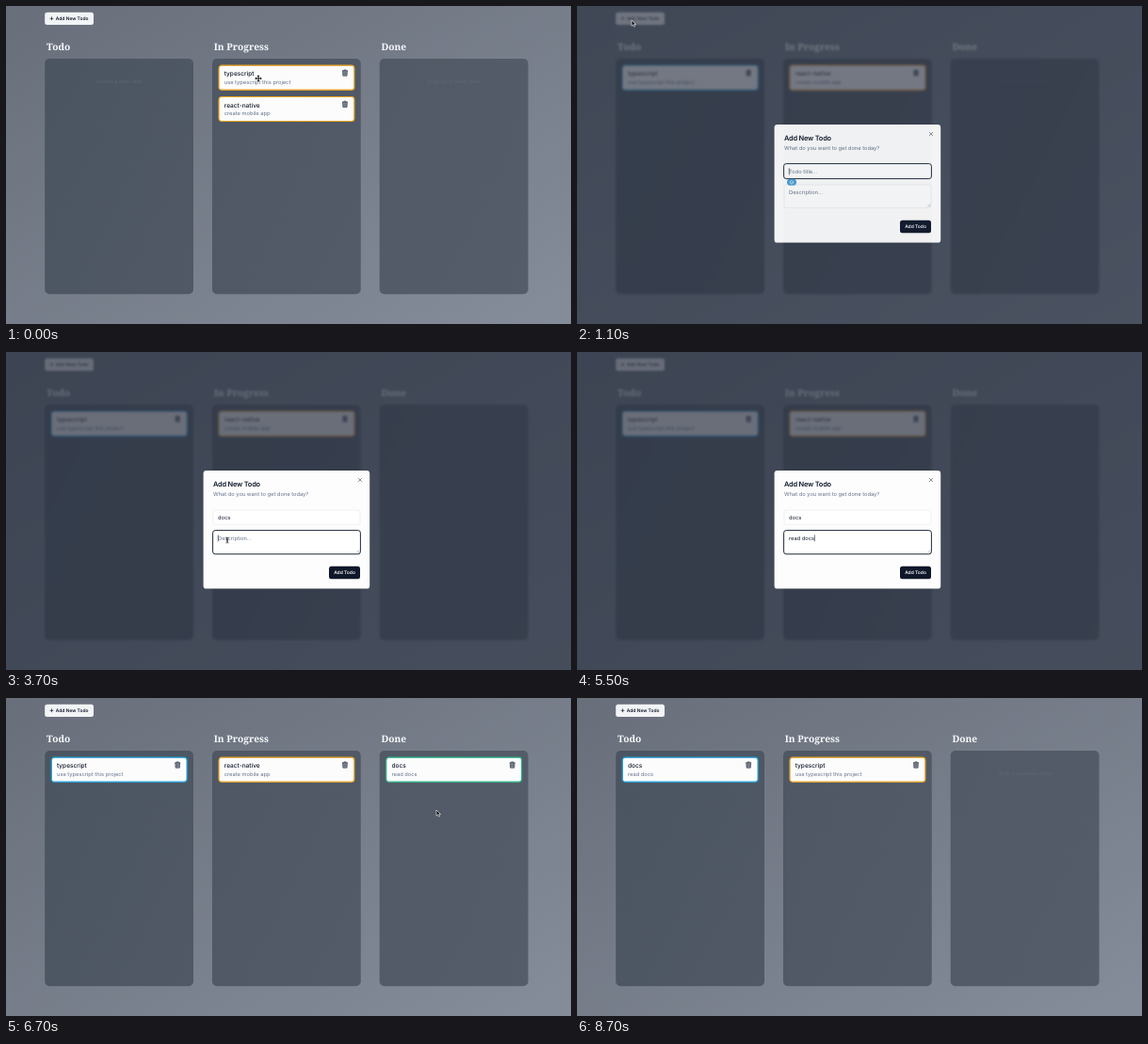
Animation, 600 px wide and 338 px high, one loop 9 s. Source, as an HTML page:

```html
<!DOCTYPE html>
<html lang="en">
<head>
<meta charset="utf-8">
<title>Todo board</title>
<style>
  html, body { margin: 0; width: 100%; height: 100%; overflow: hidden; background: #737a86; }
  svg { display: block; width: 100vw; height: 100vh; }
  text { font-family: Inter, Roboto, sans-serif; font-size: 5.74px; text-rendering: geometricPrecision; white-space: pre; }
  .heading { font: 700 10.2px "Noto Serif", serif; fill: #f8fafc; }
  .title { font-size: 6.56px; font-weight: 500; fill: #111827; }
  .label { font-size: 4.92px; font-weight: 600; }
  .muted { fill: #64748b; }
  .hint { fill: #717986; opacity: .4; text-anchor: middle; }
  .dialog-title { font-size: 7.38px; font-weight: 600; letter-spacing: -.025em; }
</style>
</head>
<body>
<svg viewBox="0 0 600 338" preserveAspectRatio="none">
  <defs>
    <linearGradient id="page" x2="1" y2="1">
      <stop stop-color="#686f7b"/><stop offset="1" stop-color="#868d9a"/>
    </linearGradient>
    <linearGradient id="panel" gradientUnits="userSpaceOnUse" x1="41" y1="56" x2="554" y2="306">
      <stop stop-color="#4b5561"/><stop offset="1" stop-color="#565d6a"/>
    </linearGradient>
    <filter id="blur" x="-5%" y="-5%" width="110%" height="110%"><feGaussianBlur stdDeviation="1.3"/></filter>
  </defs>
  <rect width="600" height="338" fill="url(#page)"/>
  <g id="board"></g>
  <g id="dialog"></g>
  <g id="pointer"></g>
</svg>
<script>
const LOOP = 9000, STEP = 100;
const COLUMN_STEP = 177.75, CARD_W = 143.8, CARD_H = 26, CARD_STEP = 33.3;

const columns = [
  { name: 'Todo', color: '#1b9fdc', hint: 'Create a new task' },
  { name: 'In Progress', color: '#f0a31c', hint: 'Drop your tasks here' },
  { name: 'Done', color: '#25b883', hint: 'Drop your tasks here' }
];

// Each stay is [start time, column]; column -1 means the card is absent.
const cards = [
  { title: 'typescript', note: 'use typescript this project', stays: [[0, 1], [500, 0], [7200, 1]] },
  { title: 'react-native', note: 'create mobile app', stays: [[0, 1], [7700, 2], [8500, -1]] },
  { title: 'docs', note: 'read docs', stays: [[0, -1], [5900, 0], [6600, 2], [8200, 0]] }
];

const drags = [
  { card: cards[0], from: 100, to: 500 },
  { card: cards[2], from: 6100, to: 6600 },
  { card: cards[0], from: 6900, to: 7200 },
  { card: cards[1], from: 7300, to: 7700 },
  { card: cards[2], from: 7800, to: 8200 }
];

// Visible pointer trips, each a list of [time, x, y].
const trips = [
  [[0, 268, 77], [100, 268, 77], [500, 120, 100], [600, 110, 100], [900, 58, 15], [1700, 58, 15]],
  [[3200, 262, 178], [3400, 235, 200], [3800, 235, 200]],
  [[5600, 340, 205], [5700, 357, 232], [5800, 357, 232], [5900, 260, 170], [6000, 163, 117],
   [6100, 163, 117], [6600, 457, 119], [6700, 457, 119], [6900, 140, 78], [7200, 300, 100],
   [7300, 300, 78], [7700, 480, 115], [7800, 460, 110], [8200, 120, 95], [8400, 537, 71],
   [8500, 537, 71]]
];

const byId = id => document.getElementById(id);
const text = (x, y, str, cls = '', extra = '') => `<text x="${x}" y="${y}" class="${cls}" ${extra}>${str}</text>`;
const box = (x, y, w, h, r, attrs) => `<rect x="${x}" y="${y}" width="${w}" height="${h}" rx="${r}" ${attrs}/>`;

function pointerAt(t) {
  const trip = trips.find(p => t >= p[0][0] && t <= p[p.length - 1][0]);
  if (!trip) return null;
  const i = Math.max(1, trip.findIndex(key => key[0] >= t));
  const [t0, x0, y0] = trip[i - 1], [t1, x1, y1] = trip[i];
  const k = (t - t0) / (t1 - t0);
  return { x: x0 + (x1 - x0) * k, y: y0 + (y1 - y0) * k };
}

function layout(t) {
  const counts = [0, 0, 0], placed = [];
  for (const card of cards) {
    const column = card.stays.filter(s => s[0] <= t).pop()[1];
    if (column < 0) continue;
    placed.push({ card, column, x: 48.3 + column * COLUMN_STEP, y: 63.2 + counts[column]++ * CARD_STEP });
  }
  return { counts, placed };
}

const trash = `<g transform="translate(133.9 7.9)" fill="none" stroke="#374151" stroke-width=".7">
  <path d="M-3 -2.3H3M-1.1 -2.5V-3.2H1.1V-2.5"/>
  <path d="M-2.4 -2.1L-2.1 3.1H2.1L2.4 -2.1Z" fill="#9299a4"/>
  <path d="M-.9 -1V2.2M.9 -1V2.2" stroke-width=".6"/></g>`;

const drawCard = ({ card, column, x, y }, opacity = 1) => `<g transform="translate(${x} ${y})" opacity="${opacity}">
  ${box(0, 0, CARD_W, CARD_H, 3, `fill="#fcfcfd" stroke="${columns[column].color}" stroke-width="1.2"`)}
  ${text(5.7, 11, card.title, 'title')}${text(5.7, 19.9, card.note, 'muted')}${trash}</g>`;

function drawBoard(t, { counts, placed }) {
  let out = box(41.2, 6.8, 51.8, 13.2, 2.5, 'fill="#f2f4f6"')
    + '<path d="M46.6 13.3h3.8M48.5 11.4v3.8" stroke="#0f172a" stroke-width=".7"/>'
    + text(52.8, 15.1, 'Add New Todo', 'label', 'fill="#0f172a"');
  columns.forEach((column, i) => {
    const x = 41.2 + i * COLUMN_STEP;
    out += text(x + 1.7, 47, column.name, 'heading') + box(x, 56, 157.8, 250.2, 5, 'fill="url(#panel)"');
    if (!counts[i]) out += text(x + 78.9, 82, column.hint, 'hint');
  });
  out += placed.map(p => drawCard(p)).join('');
  const drag = drags.find(d => t > d.from && t < d.to);
  if (drag) {
    const home = placed.find(p => p.card === drag.card);
    const grab = pointerAt(drag.from), now = pointerAt(t);
    out += drawCard({ ...home, x: home.x + now.x - grab.x, y: home.y + now.y - grab.y }, .7);
  }
  return out;
}

const typed = (str, t, start, pace) => str.slice(0, Math.max(0, Math.floor((t - start) / pace) + 1));

function caretOn(t) {
  const start = t < 2100 ? 1100 : t < 3500 ? Math.min(t, 2700) : t < 3900 ? 3500 : Math.min(t, 5100);
  return (t - start) % 1000 < 500;
}

function drawField(y, h, value, placeholder, focused) {
  const frame = focused
    ? box(219.6, y - .4, 156.8, h + .8, 2.6, 'fill="#fff" stroke="#1e293b" stroke-width="1"')
    : box(220, y, 156, h, 2.3, 'fill="#fff" stroke="#e2e8f0" stroke-width=".6"');
  return frame + text(225, y + 9.8, value || placeholder, value ? '' : 'muted', value ? 'class="value" fill="#0f172a"' : '');
}

function drawDialog(t) {
  const inNote = t >= 3500;
  const title = typed('docs', t, 2100, 200), note = typed('read docs', t, 3900, 150);
  const hover = t >= 5700;
  let out = '<rect width="600" height="338" fill="#2b3242" opacity=".7"/>'
    + box(209.6, 126, 176.6, 125.6, 3.2, 'fill="#fdfdfd"')
    + text(220, 142.5, 'Add New Todo', 'dialog-title', 'fill="#0f172a"')
    + text(220, 152.6, 'What do you want to get done today?', 'muted')
    + '<path d="M374 134l4 4m0 -4l-4 4" stroke="#5b6371" stroke-width=".7"/>'
    + drawField(168, 15.2, title, 'Todo title...', !inNote)
    + drawField(190, 24.4, note, 'Description...', inNote)
    + '<path d="M372.2 213.4l3 -3M374 213.5l1.3 -1.3" stroke="#6b7280" stroke-width=".4"/>'
    + box(343, 227.8, 33, 13.4, 2.5, `fill="${hover ? '#272e3f' : '#0f172a'}"`)
    + text(359.5, 236.3, 'Add Todo', 'label', 'fill="#f8fafc" text-anchor="middle"');
  if (t < 1700) {
    out += box(223, 183.8, 10, 7, 3.5, 'fill="#459cd5"')
      + '<path d="M228 185.2l2.2 2.2h-1.1v1.6h-2.2v-1.6h-1.1z" fill="none" stroke="#fff" stroke-width=".6"/>';
  }
  return `<g opacity="${t < 1200 ? .93 : 1}">${out}</g>`;
}

function placeCaret(t) {
  if (!caretOn(t)) return;
  const value = byId('dialog').querySelectorAll('.value, text[fill="#0f172a"]:not([class*="dialog"])');
  const y = t >= 3500 ? 199.8 : 177.8;
  const field = [...value].find(el => +el.getAttribute('y') === y);
  const x = 225.3 + (field ? field.getComputedTextLength() : 0);
  byId('dialog').insertAdjacentHTML('beforeend',
    `<path d="M${x} ${y - 5.4}v7" stroke="#0f172a" stroke-width=".6"/>`);
}

const shapes = {
  arrow: '<path d="M0 0V6.2L1.5 4.9 2.5 7.1 3.6 6.6 2.6 4.5H4.5Z" fill="#111" stroke="#fff" stroke-width=".6"/>',
  move: `<path d="M0 -3.7L1.5 -2H.5V-.5H2V-1.5L3.7 0 2 1.5V.5H.5V2H1.5L0 3.7 -1.5 2H-.5V.5H-2V1.5L-3.7 0
    -2 -1.5V-.5H-.5V-2H-1.5Z" fill="#111" stroke="#fff" stroke-width=".9" paint-order="stroke"/>`,
  text: '<path d="M-1.5 -3Q0 -3 0 -2V2Q0 3 -1.5 3M1.5 -3Q0 -3 0 -2V2Q0 3 1.5 3M-.8 0H.8" fill="none" stroke="#222" stroke-width=".7"/>'
};

function drawPointer(t, open, placed) {
  const p = pointerAt(t);
  if (!p) return '';
  const dragging = drags.some(d => t > d.from && t < d.to);
  const overCard = placed.some(c => p.x > c.x && p.x < c.x + CARD_W && p.y > c.y && p.y < c.y + CARD_H);
  const overField = p.x > 220 && p.x < 376 && p.y > 168 && p.y < 214;
  const kind = open ? (overField ? 'text' : 'arrow') : overCard && !dragging ? 'move' : 'arrow';
  return `<g transform="translate(${p.x} ${p.y})">${shapes[kind]}</g>`;
}

function render(t) {
  const open = t >= 1100 && t < 5900;
  const scene = layout(t);
  byId('board').innerHTML = drawBoard(t, scene);
  byId('board').setAttribute('filter', open ? 'url(#blur)' : 'none');
  byId('dialog').innerHTML = open ? drawDialog(t) : '';
  if (open) placeCaret(t);
  byId('pointer').innerHTML = drawPointer(t, open, scene.placed);
}

const begin = performance.now();
let shown = -1;
function tick() {
  const t = Math.floor((performance.now() - begin) % LOOP / STEP) * STEP;
  if (t !== shown) render(shown = t);
  requestAnimationFrame(tick);
}
tick();
</script>
</body>
</html>
```
